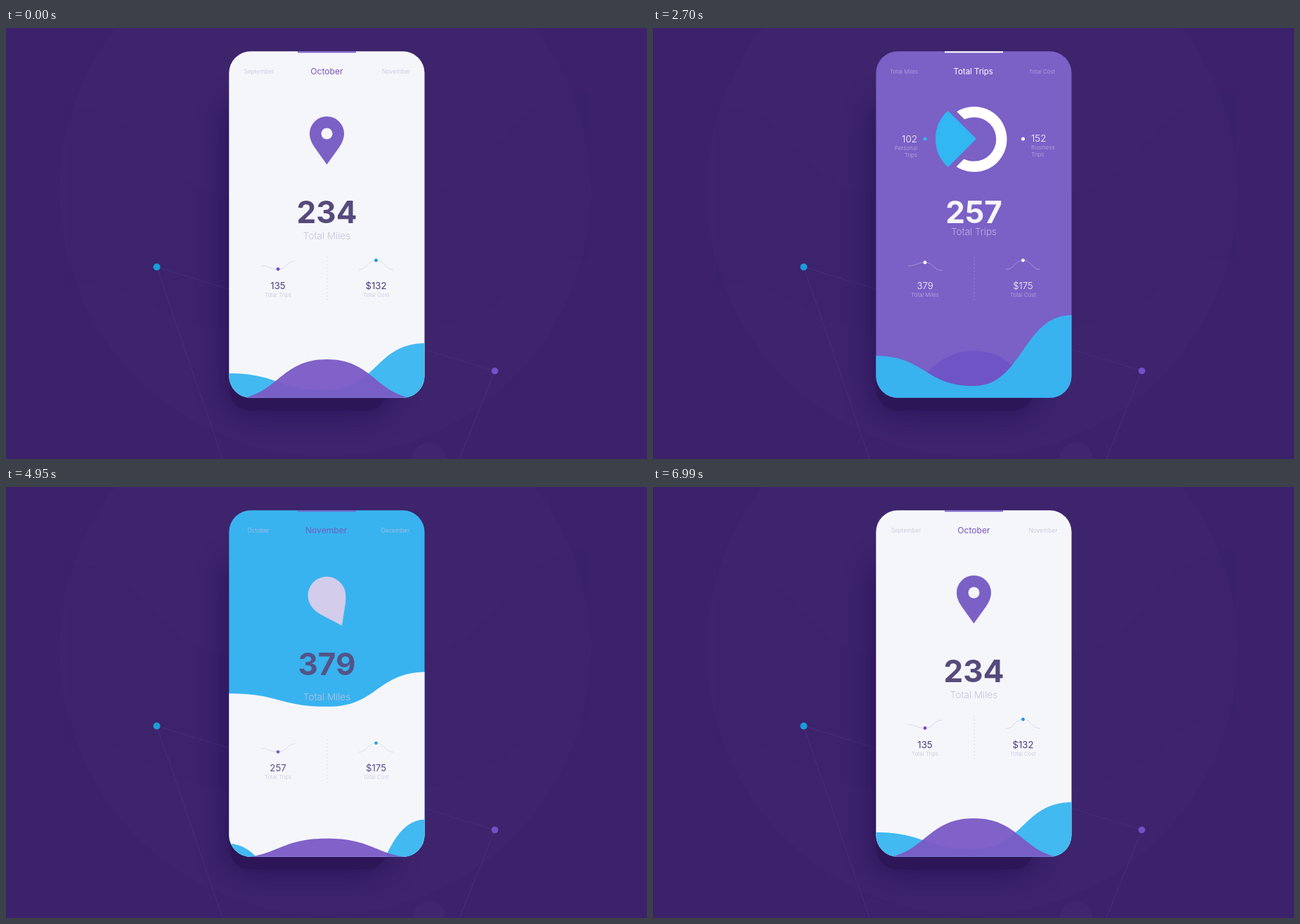
Animation, 912 px wide and 614 px high, one loop 7.35 s. Source, as an HTML page with a canvas:

```html
<!DOCTYPE html>
<html lang="en">
<head>
<meta charset="utf-8">
<title>Travel statistics</title>
<style>
  html, body { margin: 0; width: 100%; height: 100%; overflow: hidden; background: #3b226b; }
  canvas { display: block; }
</style>
</head>
<body>
<canvas id="stage" width="912" height="614"></canvas>
<script>
const ctx = document.getElementById('stage').getContext('2d');
const LOOP = 7350, TAU = Math.PI * 2;
const WHITE = [245, 246, 250], PURPLE = [123, 96, 198], SKY = [56, 179, 239];
const INK = '#564a7c', MUTED = '#c6c1dc';

const clamp = v => Math.max(0, Math.min(1, v));
const ramp = (v, a, b) => clamp((v - a) / (b - a));
const ease = p => (1 - Math.cos(Math.PI * p)) / 2;
const easeOut = p => 1 - (1 - p) ** 4;
const lerp = (a, b, p) => a + (b - a) * p;
const mix = (a, b, p) => a.map((v, i) => lerp(v, b[i], p));
const rgb = c => `rgb(${c.map(Math.round)})`;
const fadeOut = p => 1 - ramp(p, 0, .25);
const fadeIn = p => ramp(p, .15, .4);

function withAlpha(alpha, draw) {
  if (alpha <= 0) return;
  ctx.save();
  ctx.globalAlpha *= alpha;
  draw();
  ctx.restore();
}

function disc(x, y, r, color) {
  ctx.fillStyle = color;
  ctx.beginPath();
  ctx.arc(x, y, Math.max(0, r), 0, TAU);
  ctx.fill();
}

function line(color, ...points) {
  ctx.strokeStyle = color;
  ctx.lineWidth = 1;
  ctx.beginPath();
  points.forEach(([x, y]) => ctx.lineTo(x, y));
  ctx.stroke();
}

function text(str, x, y, size, color, weight = 400, align = 'center') {
  ctx.font = `${weight} ${size}px Inter, sans-serif`;
  ctx.textAlign = align;
  ctx.fillStyle = color;
  ctx.fillText(str, x, y);
}

// Smooth curve with a level tangent at every point.
function smooth(points) {
  points.forEach(([x, y], i) => {
    if (!i) return ctx.lineTo(x, y);
    const [px, py] = points[i - 1], mid = (px + x) / 2;
    ctx.bezierCurveTo(mid, py, mid, y, x, y);
  });
}

function wave(color, heights, dx = 0) {
  ctx.fillStyle = color;
  ctx.beginPath();
  ctx.moveTo(100, 700);
  smooth(heights.map((y, i) => [177 + i * 139.7 + dx, y]));
  ctx.lineTo(800, heights[3]);
  ctx.lineTo(800, 700);
  ctx.fill();
}

const hump = peak => [529, 529, peak, 529];
const SHEET = [-227, -227, -7, -326];
const rising = p => (1 - ramp(p, .2, 1)) ** 3;

function milesWaves(month, enter, exit, sway) {
  const low = rising(enter), e = ease(exit);
  const blue = mix([500, 492, 516, 449], [500, 467, 510, 409], month)
    .map((y, i) => y - sway * 19 - e * 890 + low * [60, 90, 286, 140][i]);
  wave('#42b9f1', blue);
  const crest = hump(lerp(472, 424, month) + low * 162);
  withAlpha(lerp(.95, 1, ramp(exit, 0, .2)), () =>
    wave(exit ? rgb(PURPLE) : '#7b5bc6', mix(crest, SHEET, e), sway * 4));
}

function tripsWaves(enter, exit) {
  const low = rising(enter), e = ease(exit);
  wave('#6f54c6', hump(460 + low * 162));
  wave(rgb(SKY), [500, 467, 510, 409].map((y, i) => y + low * [60, 60, 286, 140][i] - e * 890));
}

function costWaves(enter, exit) {
  const low = rising(enter);
  wave('#0099de', [515, 454, 503, 384].map(y => y + low * 160), 63);
  wave(rgb(WHITE), mix(hump(457 + low * 162), SHEET, ease(exit)), 2);
}

// Teardrop with its tip pointing down at angle 0.
function teardrop(x, y, r, angle, color) {
  ctx.save();
  ctx.translate(x, y);
  ctx.rotate(angle);
  ctx.scale(r, r);
  ctx.fillStyle = color;
  ctx.beginPath();
  ctx.arc(0, 0, 1, Math.PI, 0);
  ctx.bezierCurveTo(1, .32, .86, .58, .7, .82);
  ctx.lineTo(0, 1.8);
  ctx.lineTo(-.7, .82);
  ctx.bezierCurveTo(-.86, .58, -1, .32, -1, 0);
  ctx.fill();
  ctx.restore();
}

function sector(p) {
  ctx.save();
  ctx.translate(457 - 30 * (1 - p), 158);
  ctx.scale(lerp(.86, 1, p), lerp(.86, 1, p));
  ctx.lineJoin = 'round';
  ctx.beginPath();
  ctx.moveTo(0, 0);
  ctx.arc(0, 0, 53, Math.PI * .75, Math.PI * 1.25);
  ctx.closePath();
  if (p > .3) {
    ctx.strokeStyle = rgb(PURPLE);
    ctx.lineWidth = 20;
    ctx.stroke();
  }
  ctx.strokeStyle = ctx.fillStyle = rgb(mix([255, 255, 255], [49, 183, 242], ramp(p, 0, .6)));
  ctx.lineWidth = 4;
  ctx.stroke();
  ctx.fill();
  ctx.restore();
}

function icon(s) {
  const a = easeOut(s.toTrips), b = easeOut(s.toCost), c = easeOut(s.toMiles);
  // x, y, radius, angle in degrees
  const stops = [[456.5, 150.5, 24.5, 0], [457, 158.5, 31.3, 90], [456.5, 176.5, 39.3, 180], [456.5, 150.5, 24.5, 360]];
  let [x, y, r, angle] = mix(mix(mix(stops[0], stops[1], a), stops[2], b), stops[3], c);
  x -= s.sway * 2.8;
  angle += s.sway * 5 + s.lean;
  const donut = 1 - ramp(s.toCost, 0, .4);
  if (s.toTrips) withAlpha(donut, () =>
    disc(457, 158.5, lerp(22, 46.5, 1 - (1 - s.toTrips) ** 3), '#fff'));
  const color = mix(mix(PURPLE, WHITE, ramp(s.toCost, .1, .5)), PURPLE, ramp(s.toMiles, .25, .7));
  teardrop(x, y, r, angle * Math.PI / 180, rgb(color));
  const hole = 8 * (1 - ramp(s.toTrips, 0, .35) + ramp(s.toMiles, .55, 1));
  disc(x, y, hole, rgb(WHITE));

  const slice = ramp(s.toTrips, .4, .95);
  withAlpha(slice * donut, () => sector(slice));
  withAlpha(ramp(s.toTrips, .6, 1) * donut, legends);
  const drops = ramp(s.toCost, .4, 1) * fadeOut(s.toMiles);
  withAlpha(.48 * drops, () =>
    [[534, 101.7, 12.3], [369, 151, 10.3], [548, 237.5, 10.3]].forEach(([dx, dy, dr]) =>
      teardrop(dx, dy, dr * ease(drops), Math.PI, '#fff')));
}

function legends() {
  const legend = (x, align, value, name, y) => {
    text(value, x, y, 13.5, '#fff', 300, align);
    withAlpha(.5, () => [name, 'Trips'].forEach((word, i) =>
      text(word, x, y + 11 + i * 10, 8, '#fff', 300, align)));
  };
  disc(387, 158, 2.5, '#31b7f2');
  disc(526.5, 158, 2.5, '#fff');
  legend(376, 'right', '102', 'Personal', 163);
  legend(538, 'left', '152', 'Business', 162);
}

const SPARKS = { Trips: [338.5, 343.5, 332], Miles: [339, 334, 345.5], Cost: [344, 331, 344] };

function stat(x, dy, name, value, light, dot) {
  const ys = SPARKS[name];
  ctx.strokeStyle = light ? 'rgba(255,255,255,.32)' : '#dcd9e8';
  ctx.lineWidth = 1;
  ctx.beginPath();
  smooth(ys.map((y, i) => [x - 24.5 + i * 24.5, y + dy]));
  ctx.stroke();
  disc(x, ys[1] + dy, 2.4, dot);
  text(value, x, 371.5 + dy, 13.2, light ? '#fff' : '#4b3a80', light ? 300 : 400);
  text('Total ' + name, x, 382.7 + dy, 7.9, light ? 'rgba(255,255,255,.52)' : MUTED, 300);
}

// Figures of one screen; off is 1 while they have the full way to travel.
function figures(big, label, labelY, left, right, light, off) {
  const dy = off * 49;
  text(big, 456.5, 278 - off * 14, 44, light ? rgb(WHITE) : INK, 700);
  text(label, 456.5, labelY + off * 12.4, 13.5, light ? 'rgba(255,255,255,.52)' : MUTED, 300);
  stat(387, dy, ...left, light, light ? '#fff' : '#7350c8');
  stat(526.5, dy, ...right, light, light ? '#fff' : '#1b9cd9');
  ctx.fillStyle = light ? 'rgba(255,255,255,.3)' : '#d5d2e2';
  for (let y = 326; y <= 386; y += 5) ctx.fillRect(456.5, y + dy, 1, 1.5);
}

function monthHeader(month, sway) {
  const slots = [262, 360, 456.5, 555, 653];
  ['September', 'October', 'November', 'December'].forEach((name, i) => {
    const place = i + 1 - month;
    if (place < 0 || place > 4) return;
    const k = Math.min(3, Math.floor(place));
    const x = lerp(slots[k], slots[k + 1], place - k) + sway * 1.5 - month * 1;
    const focus = clamp(1 - Math.abs(place - 2));
    withAlpha(clamp(2 - Math.abs(place - 2)), () =>
      text(name, x, lerp(65, 66, focus), lerp(8.4, 12.1, focus),
        rgb(mix([198, 193, 220], [118, 86, 190], focus)), focus > .5 ? 400 : 300));
  });
  ctx.fillStyle = rgb(PURPLE);
  ctx.fillRect(415 - sway * 2, 33, 83, 2.3);
}

function totalHeader(s) {
  const toCost = ease(s.toCost), dy = 3.5 * (1 - ease(s.toTrips));
  const side = rgb(mix(PURPLE, [255, 255, 255], ramp(s.toTrips, .45, .8)));
  const focus = [0, 1 - toCost, toCost];
  ['Miles', 'Trips', 'Cost'].forEach((name, i) => {
    const f = focus[i], settled = ramp(s.toTrips, .45, .8);
    withAlpha(lerp(lerp(.9, .48, settled), 1, f), () =>
      text('Total ' + name, [357, 455.7, 553.5][i], lerp(65, i === 2 ? 64.5 : 66, f) + dy,
        lerp(8, 11.4, f), i === 1 ? '#fff' : side, f > .5 ? 400 : 300));
  });
  const width = 83 * clamp(s.toTrips * 1.27);
  ctx.fillStyle = '#fff';
  ctx.fillRect(456.5 - width / 2, 33, width, 2.3);
}

function backdrop() {
  ctx.fillStyle = '#3b226a';
  ctx.fillRect(0, 0, 912, 614);
  disc(454, 232, 378, '#3d246c');
  disc(602, 614, 24, '#40266f');
  withAlpha(.25, () => {
    ctx.fillStyle = '#3a2068';
    ctx.beginPath();
    smooth([[90, 110], [330, 240], [580, 235], [830, 90]]);
    smooth([[830, 330], [600, 425], [330, 430], [90, 365]]);
    ctx.fill();
  });
  line('#482d7d', [308, 614], [214.5, 340.5], [695.5, 488.5], [645, 614]);
  disc(214.5, 340.5, 5, '#1b9cd9');
  disc(695.5, 488.5, 4.8, '#7350c8');
  ctx.save();
  ctx.shadowColor = 'rgba(28,10,78,.75)';
  ctx.shadowBlur = 42;
  ctx.fillStyle = '#2d1658';
  ctx.beginPath();
  ctx.roundRect(318, 105, 224, 440, 30);
  ctx.fill();
  ctx.restore();
}

function render(t) {
  const forth = ramp(t, 270, 990), back = ramp(t, 5970, 6690);
  const overshoot = (p, from, to) => ease(p) * (1 - ease(ramp(t, from, to)));
  const s = {
    toTrips: ramp(t, 1800, 2520),
    toCost: ramp(t, 3240, 3960),
    toMiles: ramp(t, 4680, 5400),
    lean: 9 * (Math.sin(Math.PI * forth) - Math.sin(Math.PI * back)),
  };
  s.sway = overshoot(forth, 1020, 1410) + .25 * overshoot(s.toMiles, 5430, 5820)
    - .25 * overshoot(back, 6720, 6990);
  const month = ease(forth) - ease(back);

  backdrop();
  ctx.save();
  ctx.beginPath();
  ctx.roundRect(317.3, 33.2, 278.2, 493.6, 31);
  ctx.clip();
  ctx.fillStyle = rgb(t < 2520 ? WHITE : t < 3960 ? PURPLE : t < 5400 ? SKY : WHITE);
  ctx.fillRect(317, 33, 280, 495);

  if (t < 2520) milesWaves(month, 1, s.toTrips, s.sway);
  if (t >= 1800 && t < 3960) tripsWaves(s.toTrips, s.toCost);
  if (t >= 3240 && t < 5400) costWaves(s.toCost, s.toMiles);
  if (t >= 4680) milesWaves(month, s.toMiles, 0, s.sway);

  icon(s);

  const count = (a, b) => Math.round(lerp(a, b, month));
  const away = p => 1 - ease(p);
  const returned = t >= 4680;
  withAlpha(returned ? fadeIn(s.toMiles) : fadeOut(s.toTrips), () => {
    monthHeader(month, s.sway);
    figures(count(234, 379), 'Total Miles', returned ? lerp(295.5, 300.5, ease(back)) : 300.5,
      ['Trips', count(135, 257)], ['Cost', '$' + count(132, 175)],
      false, returned ? away(s.toMiles) : 0);
  });
  withAlpha(fadeIn(s.toTrips) * fadeOut(s.toMiles), () => totalHeader(s));
  withAlpha(fadeIn(s.toTrips) * fadeOut(s.toCost), () =>
    figures(257, 'Total Trips', 294.7, ['Miles', 379], ['Cost', '$175'], true, away(s.toTrips)));
  withAlpha(fadeIn(s.toCost) * fadeOut(s.toMiles), () =>
    figures(175, 'Total USD Cost', 294.7, ['Miles', 379], ['Trips', 257], true, away(s.toCost)));
  ctx.restore();
}

function frame() {
  render(performance.now() % LOOP);
  requestAnimationFrame(frame);
}
frame();
</script>
</body>
</html>
```
